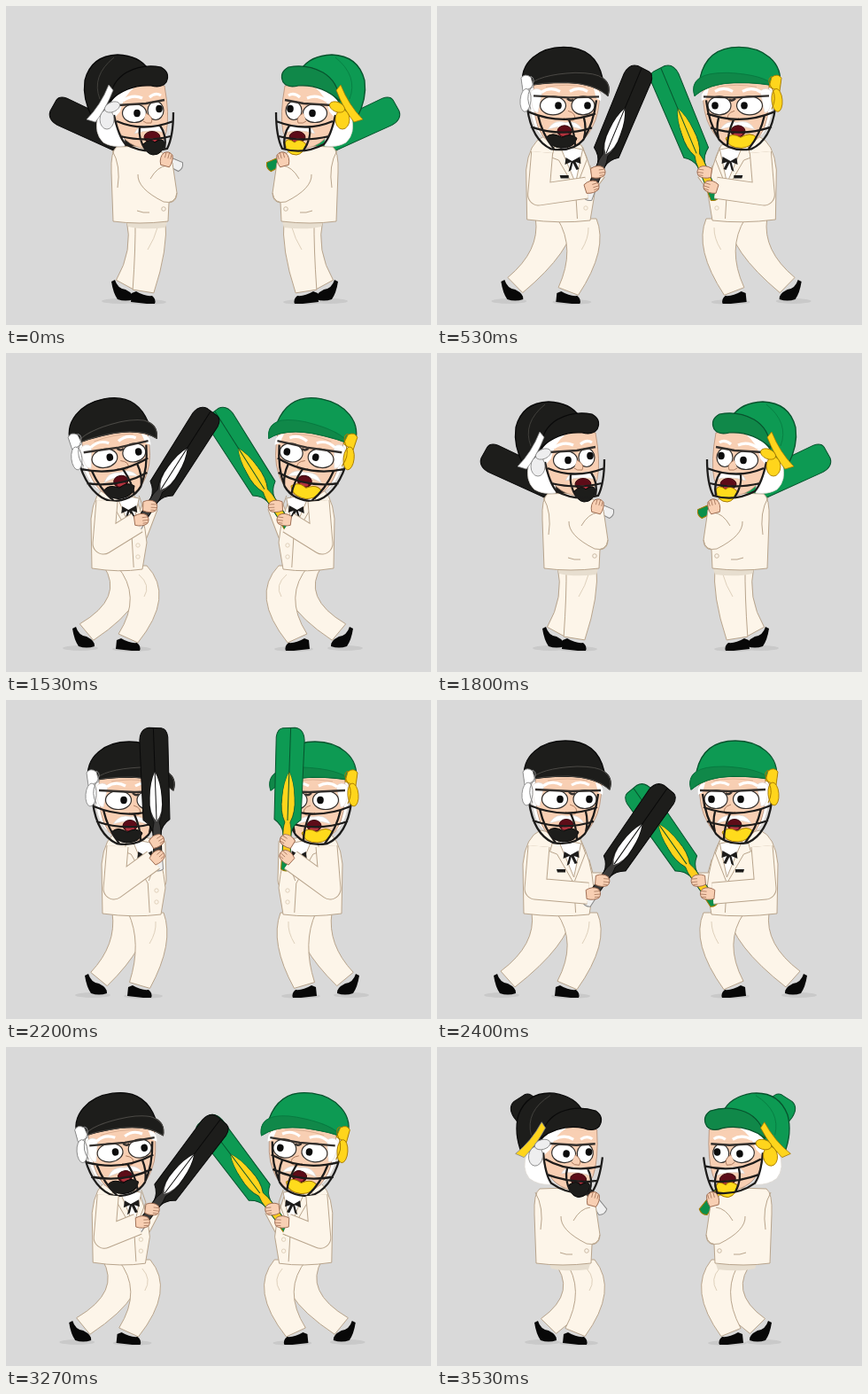
Write an HTML page with a canvas that moves like this. It is 480 by 360 pixels and loops after 3590 ms.

```html
<!DOCTYPE html>
<html lang="en">
<head>
<meta charset="utf-8">
<title>Batting duel</title>
<style>
html, body { margin: 0; width: 100%; height: 100%; overflow: hidden; background: #d9d9d9; }
canvas { display: block; width: 480px; height: 360px; }
</style>
</head>
<body>
<canvas id="stage" width="480" height="360"></canvas>
<script>
const ctx = document.getElementById('stage').getContext('2d');
const LOOP = 3590, STEP = 1000 / 15, SWING = 27;
const CREAM = '#fdf5e9', SEAM = '#b8a48c', SKIN = '#f8cfb3', INK = '#1d1c1b';

const teams = {
  dark: { main: '#1d1d1b', peak: '#1d1d1b', edge: '#090909', seam: '#4b4945', trim: '#ffffff', trimEdge: '#888888',
          chin: '#1d1d1b', chinEdge: '#090909', pad: '#eeeeef', handle: '#3b3a39', grip: '#f0f0f0' },
  green: { main: '#0d9a53', peak: '#108849', edge: '#07532d', seam: '#077a40', trim: '#ffd51c', trimEdge: '#a87a00',
           chin: '#ffdb1c', chinEdge: '#a87a00', pad: '#ffd51c', handle: '#ffcd1c', grip: '#0b8f4a' }
};

// mirror: sum of matching x on both sides; head and bat: x, y, degrees;
// body: x, width, y shift; legs: hip half-width, then hip, knee, ankle x per leg
const poses = {
  wind:    { mirror: 494, head: [135, 98, 0], bat: [198, 182, -155], body: [119, 66, 0], legs: [17, 153, 154, 135, 163, 162, 155] },
  raise:   { mirror: 488, head: [139, 91, 0], bat: [172, 192, -92], body: [108, 72, 0], legs: [20, 140, 134, 105, 158, 164, 151] },
  cross:   { mirror: 482, head: [145, 90, 0], bat: [168, 231, -55], body: [97, 80, 0], legs: [23, 130, 119, 80, 158, 166, 147] },
  clash:   { mirror: 462, head: [156, 99, 4], bat: [147, 244, -34.5], body: [102, 74, 3], legs: [23, 127, 118, 72, 155, 162, 141] },
  retreat: { mirror: 467, head: [119, 95, -11], bat: [145, 201, -57.5], body: [96, 63, 2], legs: [17, 127, 133, 91, 142, 158, 138] },
  behind:  { mirror: 488, head: [136, 96, 7], bat: [188, 187, -127], body: [110, 66, 1], legs: [17, 147, 160, 126, 161, 174, 156] }
};

const keys = [[0, 'wind'], [6, 'raise'], [9, 'cross'], [12, 'clash'], [18, 'clash'],
              [23, 'retreat'], [26, 'behind'], [27, 'wind']];

const mix = (a, b, k) => Array.isArray(a) ? a.map((v, i) => mix(v, b[i], k)) : a + (b - a) * k;

function poseAt(p) {
  const i = keys.findIndex((key, n) => p >= key[0] && p < keys[n + 1][0]);
  const [t0, from] = keys[i], [t1, to] = keys[i + 1];
  let k = (p - t0) / (t1 - t0);
  if (i === 0) k = k ** 1.3;
  const pose = {};
  for (const part in poses[from]) pose[part] = mix(poses[from][part], poses[to][part], k);
  return pose;
}

function shape(d, fill, line, width = 1) {
  const path = new Path2D(d);
  if (fill) { ctx.fillStyle = fill; ctx.fill(path); }
  if (line) { ctx.strokeStyle = line; ctx.lineWidth = width; ctx.stroke(path); }
}

function oval(x, y, rx, ry, fill, line, width = 1, turn = 0) {
  ctx.beginPath();
  ctx.ellipse(x, y, rx, ry, turn, 0, 7);
  ctx.fillStyle = fill;
  ctx.fill();
  if (line) { ctx.strokeStyle = line; ctx.lineWidth = width; ctx.stroke(); }
}

function placed(x, y, degrees, draw) {
  ctx.save();
  ctx.translate(x, y);
  ctx.rotate(degrees * Math.PI / 180);
  draw();
  ctx.restore();
}

function along([x, y, degrees], dist) {
  const a = degrees * Math.PI / 180;
  return [x + dist * Math.cos(a), y + dist * Math.sin(a)];
}

function drawLeg(half, hip, knee, kneeY, ankle, ankleY) {
  const a = Math.atan2(ankleY - kneeY, ankle - knee);
  const nx = 12 * Math.sin(a), ny = -12 * Math.cos(a);
  const bendX = knee * 1.8 - (hip + ankle) * 0.4, bendY = kneeY - 4;
  shape(`M${hip - half} 240 Q${bendX - 18} ${bendY} ${ankle - nx} ${ankleY - ny}
    L${ankle + nx} ${ankleY + ny} Q${bendX + 19} ${bendY} ${hip + half} 240Z`, CREAM, SEAM);
}

function drawLegs([half, hip1, knee1, foot1, hip2, knee2, foot2]) {
  oval(foot1 - 7, 333, 20, 3, '#c9c9c9');
  oval(foot2 + 4, 334, 22, 3, '#c9c9c9');
  placed(foot1, 316, 0, () => shape('M-16 -5 L-12 -7 Q-9 3 0 4 Q10 9 9 15 Q0 18 -9 15 Q-14 8 -16 -5Z', '#080808'));
  drawLeg(half, hip1, knee1, 280, foot1, 315);
  placed(foot2, 323, 0, () => shape('M-13 1 L-8 -1 Q2 5 10 4 Q15 8 13 13 L4 13 L-14 11Z', '#080808'));
  drawLeg(half, hip2, knee2, 278, foot2, 322);
  shape(`M${hip2 + half - 9} 250 Q${knee2 + 6} 262 ${knee2 - 2} 275`, null, '#ded0bb');
}

function drawBat(bat, team, front) {
  placed(...bat, () => {
    shape('M8 -4.5 H48 V4.5 H8Z', team.handle, team.edge);
    shape('M1 -5.5 Q-3 0 1 5.5 L16 5 V-5Z', team.grip, team.trimEdge);
    shape('M42 -4.5 Q51 -6 57 -15 L147 -16 Q160 -15 161 -5 L160 9 Q159 15 150 16 L57 15 Q51 6 42 4.5Z', team.main, team.edge);
    if (!front) return;
    shape('M38 -4.5 Q48 -5 54 -3 Q66 -9 82 -7 Q99 -6 111 0 Q99 6 82 7 Q66 9 54 3 Q48 5 38 4.5Z', team.handle, team.edge, 0.8);
    shape('M55 0 Q64 -8 82 -6.5 Q99 -6 111 0 Q99 6 82 6.5 Q64 8 55 0Z', team.trim);
    shape('M56 0 H160', null, team.edge, 1);
  });
}

function drawHand([x, y], turn) {
  placed(x, y, turn, () => {
    shape('M-8 -5 Q0 -9 6 -5 Q10 0 6 5 Q0 8 -8 5Z', SKIN, '#9b6a50', 0.9);
    shape('M1 -2.5 H7 M1 1 H8 M1 4 H6', null, '#9b6a50', 0.7);
  });
}

function sleeve(points, width) {
  ctx.beginPath();
  points.forEach(p => ctx.lineTo(...p));
  ctx.lineJoin = 'round';
  for (const [color, extra] of [[SEAM, 2], [CREAM, 0]]) {
    ctx.strokeStyle = color;
    ctx.lineWidth = width + extra;
    ctx.stroke();
  }
}

function drawTorso([x, w, dy]) {
  const right = x + w, tie = x + w * 0.67;
  placed(0, dy, 0, () => {
    shape(`M${x + 20} 147 Q${x + 3} 154 ${x} 185 L${x + 1} 241 Q${x + w / 2} 246 ${right - 5} 242
      L${right} 212 Q${right - 3} 180 ${right - 15} 157Z`, CREAM, SEAM);
    shape(`M${tie - 14} 157 L${tie + 4} 200 L${tie + 12} 162Z`, '#ffffff', SEAM);
    shape(`M${tie - 18} 153 L${tie - 23} 171 L${tie - 15} 174 L${tie + 4} 207 L${tie + 6} 240
      M${tie + 12} 159 L${tie + 17} 173 L${tie + 5} 204`, null, SEAM);
    shape(`M${tie} 175 l-7 -4 l-1 8 l7 -3 l-3 11 l3 -2 l2 -8 l4 8 l3 -1 l-4 -8 l6 2 l-1 -8Z`, INK);
    shape(`M${x + 38} 191 h10 v3.5 h-9Z`, INK);
    for (const y of [215, 228]) oval(right - 10, y, 2.2, 2.2, CREAM, '#d8c8b0', 0.8);
  });
}

function drawFrontArm([x, , dy], hand) {
  const elbow = [x + 14, 213 + dy];
  const dx = hand[0] - elbow[0], vy = hand[1] - elbow[1], len = Math.hypot(dx, vy);
  const wrist = [hand[0] - dx / len * 6, hand[1] - vy / len * 6];
  sleeve([[x + 18, 165 + dy], elbow, wrist], 23);
}

function drawTurnedBody([x, , dy]) {
  placed(x - 119, dy, 0, () => {
    shape('M136 244 H182 L180 250 Q155 253 138 249Z', '#e7decf');
    shape('M125 159 Q118 164 119 188 L121 243 Q150 247 183 243 L184 222 Q193 221 193 211 L188 177 Q176 160 155 158Z', CREAM, SEAM);
    shape('M149 190 Q148 206 178 221 Q191 224 193 211 M163 195 Q171 181 182 180 M120 163 Q130 180 126 205 M148 231 Q155 234 162 233', null, SEAM);
    oval(178, 229, 2.3, 2.3, CREAM, SEAM, 0.7);
  });
}

function drawEyes(eyes, pupils) {
  for (const [x, y, rx, ry] of eyes) oval(x, y, rx, ry, '#ffffff', '#34302d', 1.2);
  for (const [x, y] of pupils) oval(x, y, 3.8, 4.2, '#0c0c0c');
}

function drawMouth(x, y, rx, ry) {
  oval(x, y, rx, ry, '#5d0c18', '#3c0a10');
  oval(x, y + ry * 0.5, rx * 0.6, ry * 0.35, '#b3333e');
}

function drawFrontHead(team) {
  ctx.translate(-145, -90);
  shape('M107 90 Q104 135 122 148 L132 150 L126 92Z', '#ffffff', '#d4cec8');
  shape('M111 88 Q147 76 186 92 Q186 122 177 137 Q165 161 140 159 Q118 153 113 125Z', SKIN, '#b28d76', 0.8);
  shape('M108 96 Q115 90 121 96 L116 120 Q108 121 108 96Z', '#ffffff', '#ddd6d0', 0.6);
  shape('M179 93 Q189 95 187 107 L182 104Z', '#ffffff');
  shape('M120 97 Q130 90 141 96 M152 96 Q162 90 172 96', null, '#ffffff', 3.2);
  shape('M125 91 Q147 87 170 91', null, '#d7a98c', 0.8);
  drawEyes([[133, 112, 14.5, 10.5], [167, 112, 13, 10.5]], [[139, 112], [172, 112]]);
  shape('M111 101 L151 103 L185 102 M149 104 Q153 108 156 105', null, '#34302d', 2.4);
  shape('M150 118 Q160 121 157 128 Q150 131 145 126', SKIN, '#a8775b', 0.9);
  shape('M127 139 Q134 127 147 131 Q160 128 166 139 Q147 132 127 139Z', '#ffffff', '#d6d0ca', 0.6);
  drawMouth(146, 141, 8, 6.5);
  shape('M125 148 Q132 141 143 148 Q153 142 160 149 Q157 160 142 160 Q130 159 125 148Z', team.chin, team.chinEdge);
  shape('M104 115 Q109 151 131 161 Q155 165 167 151 Q179 132 182 106 M105 119 Q143 135 181 121 M108 136 Q143 148 177 137 M116 123 Q121 145 134 161 M151 128 Q158 144 158 158 M168 126 Q171 137 168 149', null, INK, 2.3);
  shape('M99 91 C94 62 119 46 145 46 C169 46 184 58 189 81 Q199 88 195 101 Q180 87 148 86 Q118 86 99 91Z', team.main, team.edge, 1.3);
  shape('M105 90 Q116 77 158 75 Q182 75 189 81 Q199 88 195 101 Q180 87 148 86 Q118 86 105 90Z', team.peak, team.seam, 1);
  shape('M97 81 Q101 75 108 80 L111 91 L99 96Z', team.trim, team.trimEdge, 0.9);
  oval(102, 106, 6, 13, team.trim, team.trimEdge, 0.9, 0.08);
  shape('M108 79 Q115 82 107 94 Q102 104 108 116', null, team.trimEdge, 1);
}

function drawTurnedHead(team, strap) {
  ctx.translate(-135, -98);
  shape('M104 124 Q99 144 110 154 Q120 160 134 158 L132 112Z', '#ffffff', '#ddd8d2', 0.8);
  shape('M118 104 Q148 84 179 90 Q185 123 181 142 Q176 161 158 161 Q132 158 123 131Z', SKIN, '#b28d76', 0.8);
  shape('M118 109 Q127 93 145 92 Q132 102 129 119 L122 127Z', '#ffffff');
  shape('M132 107 Q143 99 154 104 M162 103 Q169 97 175 101', null, '#ffffff', 3.2);
  drawEyes([[145, 121, 13.5, 10.5], [169, 118, 9, 10.5]], [[148, 121], [173, 116]]);
  shape('M126 112 L158 110 L179 106', null, '#34302d', 2.4);
  shape('M158 121 Q167 125 164 132 Q158 133 155 130', SKIN, '#a8775b', 0.9);
  shape('M145 144 Q150 132 163 136 Q175 130 180 143 Q164 138 145 144Z', '#ffffff', '#d6d0ca', 0.6);
  drawMouth(165, 148, 9, 6.5);
  shape('M155 156 Q163 148 168 154 Q177 147 179 155 Q177 168 166 168 Q158 167 155 156Z', team.chin, team.chinEdge);
  shape('M122 123 Q127 147 135 156 Q157 168 182 161 Q189 147 189 120 M125 130 Q155 143 189 130 M129 147 Q159 154 186 147 M151 137 Q149 150 158 163 M174 135 Q182 146 179 161', null, INK, 2.3);
  shape('M98 127 Q86 105 89 84 Q96 56 126 55 Q151 56 161 72 L134 92 Q118 104 110 122Z', team.main, team.edge, 1.3);
  shape('M106 105 Q96 79 122 58', null, team.seam, 0.8);
  shape('M117 107 Q119 85 136 75 Q154 65 175 69 Q186 75 181 86 Q176 93 164 90 Q138 88 117 107Z', team.peak, team.edge, 1.2);
  shape('M116 89 L121 95 Q113 116 101 131 L91 128 Q107 112 116 89Z', strap, team.trimEdge, 0.8);
  oval(114, 128, 8, 11, team.pad, team.trimEdge, 0.9);
  oval(120, 114, 9, 5.5, team.pad, team.trimEdge, 0.9, -0.4);
}

function drawPlayer(pose, team, phase) {
  const turned = phase < 4 || phase > 24;
  const { bat, body, head } = pose;
  if (turned) drawBat(bat, team, false);
  drawLegs(pose.legs);
  if (turned) {
    drawTurnedBody(body);
    const strap = phase > 24 ? teams.green.trim : team.trim;
    placed(...head, () => drawTurnedHead(team, strap));
    const palm = along(bat, 17);
    drawHand([palm[0] - 1, palm[1] - 2], -75);
    return;
  }
  const low = along(bat, 15), high = along(bat, 33);
  sleeve([[body[0] + body[1] - 14, 182 + body[2]], [body[0] + body[1] - 8, 204], high], 17);
  drawTorso(body);
  placed(...head, () => drawFrontHead(team));
  drawBat(bat, team, true);
  drawHand(high, bat[2] + 60);
  drawFrontArm(body, low);
  drawHand(low, bat[2] + 50);
}

function drawSpark(x, y, r) {
  ctx.beginPath();
  for (let i = 0; i < 18; i++) {
    const a = i * Math.PI / 9, d = i % 2 ? r * 0.6 : r;
    ctx.lineTo(x + d * Math.cos(a), y + d * Math.sin(a));
  }
  ctx.closePath();
  ctx.fillStyle = '#ffd51c';
  ctx.fill();
  ctx.strokeStyle = '#b87a08';
  ctx.lineWidth = 0.8;
  ctx.stroke();
}

function draw(now) {
  const phase = Math.floor((now % LOOP + 5) / STEP) % SWING;
  const pose = poseAt(phase);
  ctx.fillStyle = '#d9d9d9';
  ctx.fillRect(0, 0, 480, 360);
  ctx.save();
  ctx.translate(pose.mirror, 0);
  ctx.scale(-1, 1);
  drawPlayer(pose, teams.green, phase);
  ctx.restore();
  drawPlayer(pose, teams.dark, phase);
  if (phase >= 12 && phase <= 18) {
    drawSpark(206, 184, 6);
    drawSpark(232, 163, 7);
    drawSpark(237, 206, 10);
  }
}

const start = performance.now();
function tick() {
  draw(performance.now() - start);
  requestAnimationFrame(tick);
}
tick();
</script>
</body>
</html>
```
